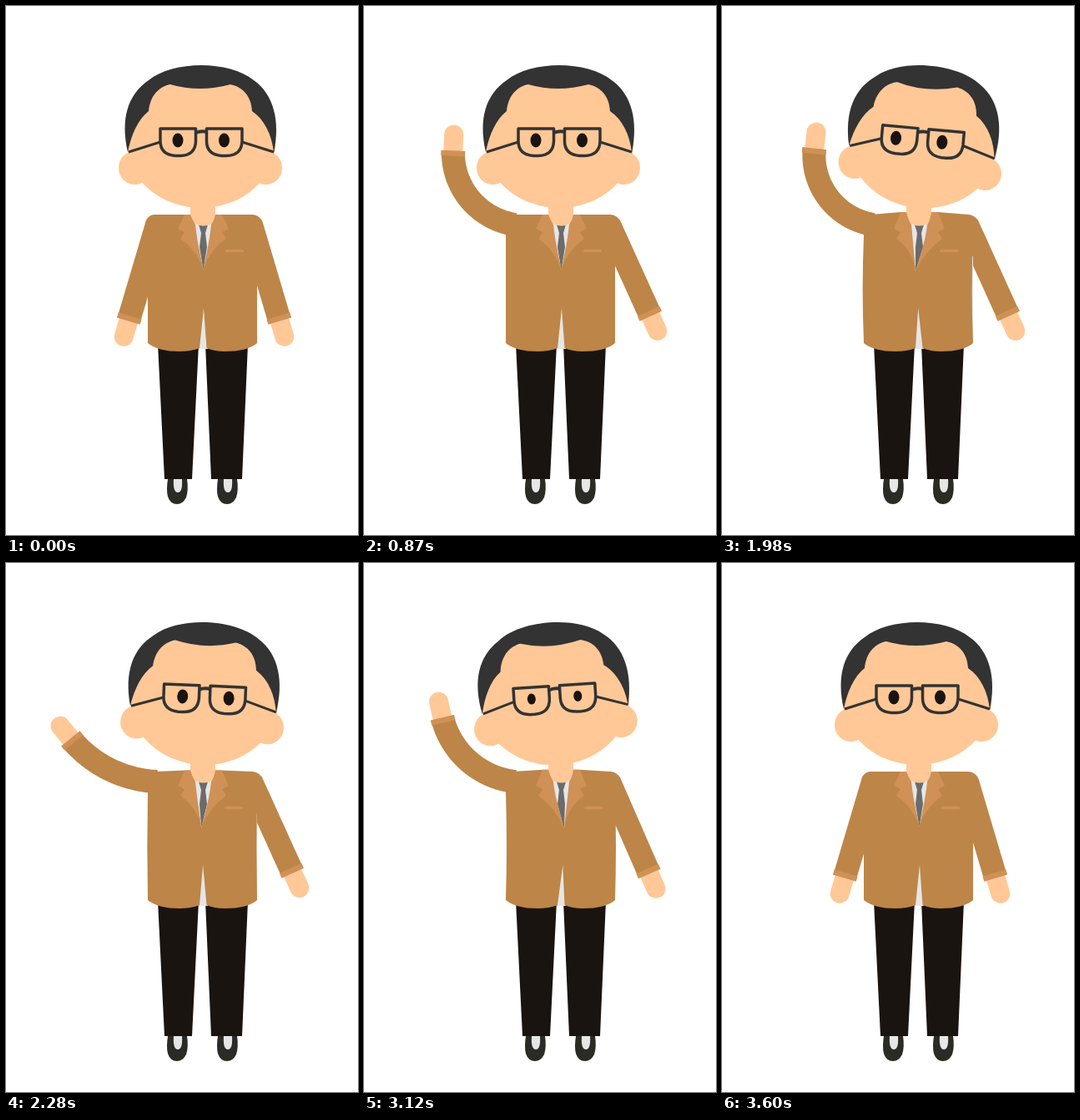
An HTML page with a canvas that plays this animation: 422x634 px, repeating every 3750 ms.

```html
<!DOCTYPE html>
<html lang="en">
<head>
<meta charset="utf-8">
<title>Waving man</title>
<style>
  html, body { margin: 0; height: 100%; overflow: hidden; background: #fff; }
  canvas { display: block; }
</style>
</head>
<body>
<canvas id="stage" width="422" height="634"></canvas>
<script>
const ctx = document.getElementById('stage').getContext('2d');
const LOOP = 3750, STEP = 30, RAD = Math.PI / 180;
const SKIN = '#ffc896', HAIR = '#333333', COAT = '#bd8548', TRIM = '#cf9155',
      SHIRT = '#e6e6e6', TIE = '#6b6b6b', PANTS = '#1a1410', SHOE = '#2b2b26';

// Each track is a list of [time, value] keys, eased in between.
const WAVE = [[330, -73.5], [930, 96], [1440, 31], [1950, 96], [2460, 32], [2990, 96], [3600, -73.5]];
const REACH = [[180, -73.5], [840, -65.6], [3000, -65.6], [3600, -73.5]];
const TILT = [[900, 0], [1560, 5.1], [2100, 5.1], [2640, -5], [2940, -5], [3480, 0]];
const GAZE = [[900, 0], [1380, -5.8], [1860, -5.8], [2520, 5.6], [2640, 5.6], [3100, 0]];
const PUPIL = [[2940, 1], [3120, 0.77], [3300, 1]];

function track(keys, t) {
  if (t <= keys[0][0]) return keys[0][1];
  for (let i = 1; i < keys.length; i++) {
    const [t0, a] = keys[i - 1], [t1, b] = keys[i];
    if (t <= t1) {
      const u = (t - t0) / (t1 - t0);
      return a + (b - a) * u * u * (3 - 2 * u);
    }
  }
  return keys[keys.length - 1][1];
}

function fill(path, color) {
  ctx.fillStyle = color;
  ctx.fill(new Path2D(path));
}

function stroke(path, color, width, cap = 'butt') {
  ctx.strokeStyle = color;
  ctx.lineWidth = width;
  ctx.lineCap = cap;
  ctx.lineJoin = 'round';
  ctx.stroke(new Path2D(path));
}

function ellipse(x, y, rx, ry, color) {
  ctx.fillStyle = color;
  ctx.beginPath();
  ctx.ellipse(x, y, rx, ry, 0, 0, 7);
  ctx.fill();
}

// Sleeve bending from angle `start` at the shoulder to `end` at the wrist; 0 points left.
function arm(start, end, length) {
  const steps = 40, points = [];
  let x = 181, y = 262, dx, dy;
  for (let i = 0; i <= steps; i++) {
    points.push(x + ' ' + y);
    const angle = (start + (end - start) * (i + 0.5) / steps) * RAD;
    dx = -Math.cos(angle);
    dy = -Math.sin(angle);
    if (i < steps) {
      x += dx * length / steps;
      y += dy * length / steps;
    }
  }
  const along = d => (x + dx * d) + ' ' + (y + dy * d);
  stroke(`M${along(-4)}L${along(20)}`, SKIN, 23, 'round');
  stroke('M' + points.join('L'), COAT, 28);
  stroke(`M${along(-6)}L${along(0.5)}`, TRIM, 29);
}

function waveArm(end) {
  const lift = end - 34;
  if (lift > 0) arm(lift * 0.15, end, 116 + lift * 0.17);
  else arm(lift * 73.5 / 107.5, end, 116 - lift * 0.037);
}

function legs() {
  fill('M182 405H231L223 567H190Z M239 405H290L283 567H246Z', PANTS);
  for (const x of [193, 253]) {
    fill(`M${x + 1} 567H${x + 24}Q${x + 26} 580 ${x + 23} 589Q${x + 19} 597 ${x + 12} 597Q${x + 4} 597 ${x + 1} 588Q${x - 1} 580 ${x + 1} 567Z`, SHOE);
    fill(`M${x + 8} 567H${x + 18}Q${x + 19} 583 ${x + 13} 583Q${x + 7} 583 ${x + 8} 567Z`, SHIRT);
  }
}

function torso(tilt) {
  const side = -tilt * 0.35, bend = side * 1.5, rise = 250 - Math.abs(tilt) * 0.6;
  const tip = 236.5 - tilt * 0.9, tipY = 316 + Math.abs(tilt) * 0.4, slit = 237 + side;
  fill('M172 300H301V404H242V411H231V404H172Z', SHIRT);
  fill(`M178 250L214 ${rise}H259L296 250Q303 251 307 257L301 275Q${301 + bend} 340 301 404
        Q290 414 262 414Q250 414 240.5 410L${slit} 362L232 410Q222 414 208 414
        Q182 414 170 404Q${170 + bend} 340 170 275L167.5 258Q171 250 178 250Z`, COAT);
  fill(`M221 ${rise}H251L247 272L${tip} ${tipY}L227 272Z`, SHIRT);
  fill(`M231 262H242L239 272L241 289L${tip} ${tipY}L232 289L234 272Z`, TIE);
  fill('M221 232H251V251Q249 257 246 261Q237 266 227 261Q222 256 221 251Z', SKIN);
  fill(`M214 ${rise}H221Q223 256 227 262Q229 282 ${tip} ${tipY}Q229 293 209 279L214 271L206 267Z
        M259 ${rise}H251Q250 256 246 262Q244 282 ${tip} ${tipY}Q244 293 264 279L259 271L267 267Z`, TRIM);
  stroke(`M${264.5 + side} 293.5h19`, TRIM, 3.5, 'round');
}

function glasses(shift) {
  for (const x of [185 + shift, 240.5 + shift]) {
    stroke(`M${x} 147H${x + 42.5}V162Q${x + 42} 179 ${x + 24} 179.5H${x + 18}Q${x} 178 ${x} 162Z`, HAIR, 3.5);
  }
  stroke(`M147 175L${185 + shift} 163M${283 + shift} 163L321 175`, HAIR, 3);
  stroke(`M${227 + shift} 152q7 -3 14 -1`, HAIR, 4);
}

function head(tilt, gaze, size) {
  ctx.save();
  ctx.translate(235, 242);
  ctx.rotate(tilt * RAD);
  ctx.translate(-235, -242);
  ellipse(154.5, 194, 19.5, 20, SKIN);
  ellipse(311.5, 194, 19.5, 20, SKIN);
  ellipse(234, 164.5, 89, 77.5, SKIN);
  fill('M160 140L180 96H287L306 140Z', SKIN);
  fill(`M146 175C137 135 146 106 171 89C200 65 268 65 297 89C321 106 329 138 321 176
        C319 155 310 136 295 126C294 108 284 97 269 94Q232 104 197 94
        C185 96 173 106 171 126C158 136 150 155 146 175Z`, HAIR);
  ellipse(206 + gaze, 161, 6.5 * size, 8.5 * size, PANTS);
  ellipse(261.5 + gaze, 161, 6.5 * size, 8.5 * size, PANTS);
  glasses(gaze * 0.2);
  ctx.restore();
}

function draw(t) {
  const tilt = track(TILT, t), reach = track(REACH, t);
  ctx.fillStyle = '#fff';
  ctx.fillRect(0, 0, 422, 634);
  legs();
  waveArm(track(WAVE, t));
  ctx.save();
  ctx.translate(475, 0);
  ctx.scale(-1, 1);
  arm(reach, reach, 120);
  ctx.restore();
  torso(tilt);
  head(tilt, track(GAZE, t), track(PUPIL, t));
}

function frame() {
  draw(Math.floor(performance.now() % LOOP / STEP) * STEP);
  requestAnimationFrame(frame);
}
frame();
</script>
</body>
</html>
```
